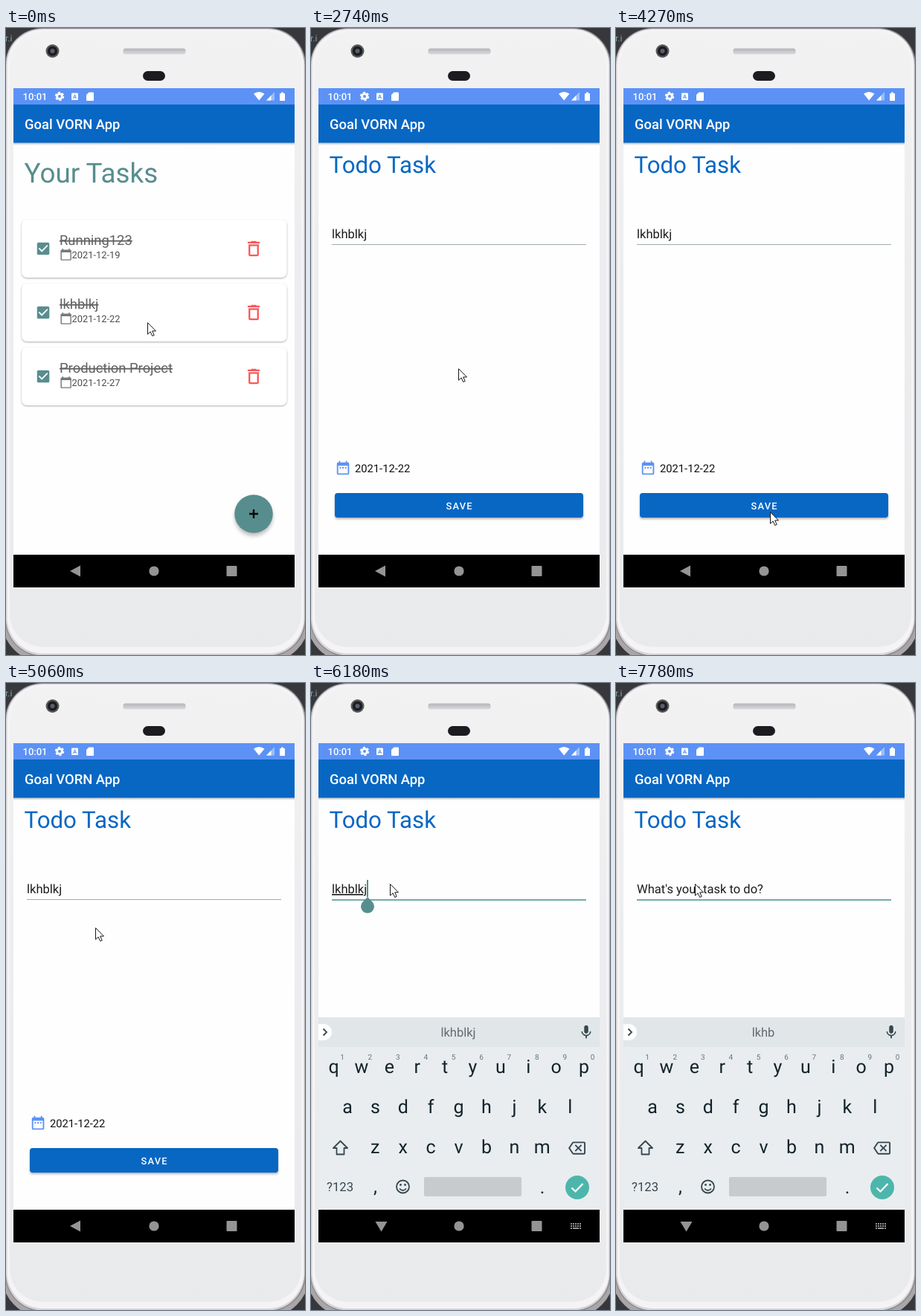
Animation of 402 by 844 pixels, one loop 8 s. Source, as an HTML page:

```html
<!DOCTYPE html>
<html lang="en">
<head>
<meta charset="utf-8">
<title>Task editing</title>
<style>
  html, body { margin: 0; width: 100%; height: 100%; overflow: hidden; background: #37383c; }
  svg { display: block; width: 100%; height: 100%; }
  text { font-family: Roboto, sans-serif; text-rendering: geometricPrecision; white-space: pre; }
  .mid { text-anchor: middle; }
  .medium { font-weight: 500; }
  .teal { fill: #588d8e; }
  .blue { fill: #0767c3; }
  .card { fill: #fff; filter: drop-shadow(0 1px 1px rgba(0,0,0,.32)); }
  .done { font-size: 18.4px; fill: #616161; text-decoration: line-through; }
  .field { font-size: 16.56px; fill: #1c1c1c; }
  .typed { text-decoration: underline; text-decoration-skip-ink: none; }
  .raised { filter: drop-shadow(0 2px 1.5px rgba(0,0,0,.3)); }
  .key { font-size: 25px; fill: #13232a; text-anchor: middle; }
  .digit { font-size: 10px; fill: #69747a; text-anchor: middle; }
  .line { fill: none; stroke: #37474f; stroke-width: 1.8; }

  /* every part switches hard at its own moments of the 8 s loop */
  .a { animation: 8s step-end infinite; }
  .off { opacity: 0; }
  .list { animation-name: list; }
  .edit { animation-name: edit; }
  .idle { animation-name: idle; }
  .focus { animation-name: focus; }
  .caret { animation-name: caret; }
  .handle { animation-name: handle; }
  .before { animation-name: before; }
  .ime { animation-name: ime; }
  .keys { animation-name: keys; }
  .full { animation-name: full; }
  .cut { animation-name: cut; }
  .short { animation-name: short; }
  .empty { animation-name: empty; }
  .guess1 { animation-name: guess1; }
  .guess2 { animation-name: guess2; }
  .pointer { animation-name: pointer; transform: translate(190px, 396px); }

  @keyframes list { 14% { opacity: 0; } }
  @keyframes edit { 14% { opacity: 1; } }
  @keyframes idle { 72% { opacity: 0; } }
  @keyframes focus { 72% { opacity: 1; } }
  @keyframes handle { 75.375% { opacity: 1; } 84.25% { opacity: 0; } }
  @keyframes before { 75.375% { opacity: 0; } }
  @keyframes ime { 75.375% { opacity: 1; } }
  @keyframes keys { 77.25% { opacity: 1; } }
  @keyframes full { 75.375% { opacity: 1; } 85.75% { opacity: 0; } }
  @keyframes cut { 85.75% { opacity: 1; } 90.625% { opacity: 0; } }
  @keyframes short { 90.625% { opacity: 1; } 92.125% { opacity: 0; } }
  @keyframes empty { 92.125% { opacity: 1; } }
  @keyframes guess1 { 90.625% { opacity: 0; } }
  @keyframes guess2 { 90.625% { opacity: 1; } }
  @keyframes caret {
    0% { opacity: 0; transform: translate(75px); }
    73.5% { opacity: 1; transform: translate(75px); }
    80.625% { opacity: 0; transform: translate(75px); }
    84.25% { opacity: 1; transform: translate(75px); }
    85.75% { opacity: 1; transform: translate(71px); }
    90.625% { opacity: 1; transform: translate(58.5px); }
    92.125% { opacity: 1; transform: translate(28px); }
    97.25%, 100% { opacity: 0; transform: translate(28px); }
  }
  @keyframes pointer {
    34.25% { transform: translate(198px, 458px); }
    35.75% { transform: translate(212px, 590px); }
    37.25% { transform: translate(219px, 681px); }
    39.125% { transform: translate(204px, 560px); }
    40.625% { transform: translate(160px, 372px); }
    42.125% { transform: translate(133px, 273px); }
    44% { transform: translate(144px, 311px); }
    45.5% { transform: translate(178px, 420px); }
    47% { transform: translate(212px, 546px); }
    48.5% { transform: translate(225px, 630px); }
    50% { transform: translate(213px, 651px); }
    51.875% { transform: translate(210px, 654px); }
    53.375% { transform: translate(207px, 651px); }
    54.875% { transform: translate(206px, 648px); }
    56.75% { transform: translate(206px, 645px); }
    59.875% { transform: translate(168px, 508px); }
    61.5% { transform: translate(133px, 371px); }
    63.25% { transform: translate(120px, 329px); }
    65.125% { transform: translate(108px, 265px); }
    66.875% { transform: translate(107px, 268px); }
    68.5%, 100% { transform: translate(106px, 270px); }
  }
</style>
</head>
<body>
<svg viewBox="0 0 402 844">
  <defs>
    <linearGradient id="face" x2="0" y2="1">
      <stop stop-color="#f2f2f3"/><stop offset=".35" stop-color="#ededef"/><stop offset="1" stop-color="#e9eaec"/>
    </linearGradient>
    <linearGradient id="slot" x2="0" y2="1">
      <stop stop-color="#b4b4b8"/><stop offset="1" stop-color="#dcdcdf"/>
    </linearGradient>
    <linearGradient id="drop" x2="0" y2="1">
      <stop stop-color="#000" stop-opacity=".28"/><stop offset="1" stop-color="#000" stop-opacity="0"/>
    </linearGradient>
    <path id="check" d="M19 3H5c-1.11 0-2 .9-2 2v14c0 1.1.89 2 2 2h14c1.11 0 2-.9 2-2V5c0-1.1-.89-2-2-2zm-9 14l-5-5 1.41-1.41L10 14.17l7.59-7.59L19 8l-9 9z"/>
    <path id="bin" d="M6 19c0 1.1.9 2 2 2h8c1.1 0 2-.9 2-2V7H6v12zM8 9h8v10H8V9zm7.5-5l-1-1h-5l-1 1H5v2h14V4h-3.5z"/>
    <path id="day" d="M20 3h-1V1h-2v2H7V1H5v2H4c-1.1 0-2 .9-2 2v16c0 1.1.9 2 2 2h16c1.1 0 2-.9 2-2V5c0-1.1-.9-2-2-2zm0 18H4V8h16v13z"/>
  </defs>

  <!-- phone body -->
  <rect width="402" height="844" fill="#37383c"/>
  <text x="-1" y="18" font-size="12" fill="#86a6b0">r.i</text>
  <rect x="-6" y="600" width="414" height="254" rx="58" fill="#aaa6a8"/>
  <rect x="-1" y="0" width="404" height="846" rx="50" fill="#8b8a8d"/>
  <rect x="0" y="1" width="401.5" height="843.5" rx="49" fill="#d5d4d7"/>
  <rect x="1.5" y="2" width="399" height="840" rx="48" fill="#f5f3f5"/>
  <rect x="5" y="6" width="392" height="827" rx="44" fill="url(#face)"/>
  <circle cx="62.5" cy="31" r="9" fill="#58585c"/>
  <circle cx="62.5" cy="31" r="6.6" fill="#1d1d21"/>
  <circle cx="62.5" cy="31" r="3" fill="#56616d"/>
  <rect x="157.5" y="27.5" width="84" height="8" rx="3" fill="url(#slot)"/>
  <rect x="184" y="58" width="30" height="13" rx="6.5" fill="#1b1b20"/>

  <!-- bars -->
  <rect x="10" y="81" width="378" height="672" fill="#fefefe"/>
  <rect x="10" y="154" width="378" height="4" fill="url(#drop)"/>
  <rect x="10" y="81" width="378" height="22" fill="#5c92f6"/>
  <rect class="blue" x="10" y="103" width="378" height="51.5"/>
  <g fill="#fff">
    <text x="22.5" y="97" font-size="13" class="medium">10:01</text>
    <circle cx="72" cy="92" r="3.4" fill="none" stroke="#fff" stroke-width="2.8"/>
    <circle cx="72" cy="92" r="5.3" fill="none" stroke="#fff" stroke-width="1.8" stroke-dasharray="3 2.55"/>
    <rect x="88" y="87.5" width="9" height="9.5" rx="1"/>
    <text x="92.5" y="95" font-size="7.5" font-weight="700" class="mid" fill="#5c92f6">A</text>
    <path d="M111.5 86.500H117a1 1 0 0 1 1 1V97a1 1 0 0 1-1 1h-8a1 1 0 0 1-1-1V90z"/>
    <path d="M333 88.500Q340 83.500 347.500 88.500L340.200 97.500z"/>
    <path d="M361 86v11.500H350z" opacity=".4"/>
    <path d="M356.500 90.700v6.800H350z"/>
    <path d="M368 88h2v-1.500h3V88h2v10h-7z"/>
    <text x="25" y="136" font-size="18.4" class="medium">Goal VORN App</text>
  </g>

  <!-- task list -->
  <g class="a list">
    <text x="24.5" y="208" font-size="36.8" class="teal">Your Tasks</text>
    <g id="cards"></g>
    <circle class="teal" cx="333" cy="654" r="25.8" style="filter:drop-shadow(0 4px 2.5px rgba(0,0,0,.25))"/>
    <path d="M327 654h12M333 648v12" stroke="#080808" stroke-width="2.4"/>
  </g>

  <!-- task editor -->
  <g class="a edit off">
    <text x="24.5" y="195" font-size="31.28" class="blue">Todo Task</text>
    <rect class="a idle" x="28" y="291" width="342" height="1" fill="#a0adac"/>
    <rect class="a focus off" x="28" y="291" width="342" height="2" fill="#72acaa"/>
    <text class="a field before" x="28" y="283">lkhblkj</text>
    <text class="a field typed full off" x="28" y="283">lkhblkj</text>
    <text class="a field typed cut off" x="28" y="283">lkhblk</text>
    <text class="a field typed short off" x="28" y="283">lkhb</text>
    <text class="a field empty off" x="28" y="283">What's your task to do?</text>
    <rect class="a caret teal off" y="265" width="2" height="23"/>
    <path class="a handle teal off" d="M76 288.1l6.36 6.36a9 9 0 1 1-12.72 0z"/>
    <path transform="translate(32 581) scale(.92)" fill="#5c92f6" d="M9 11H7v2h2v-2zm4 0h-2v2h2v-2zm4 0h-2v2h2v-2zm2-7h-1V2h-2v2H8V2H6v2H5c-1.11 0-2 .9-2 2v14c0 1.1.89 2 2 2h14c1.1 0 2-.9 2-2V6c0-1.1-.9-2-2-2zm0 16H5V9h14v11z"/>
    <text x="59" y="598" font-size="14.72" fill="#111">2021-12-22</text>
    <rect class="blue raised" x="32" y="626" width="334" height="33" rx="3.7"/>
    <text x="181.5" y="648" font-size="12.9" letter-spacing="1.15" fill="#fff" class="medium">SAVE</text>
  </g>

  <!-- keyboard -->
  <g class="a keys off">
    <rect x="10" y="450" width="378" height="259" fill="#e9edf0"/>
    <rect x="10" y="450" width="378" height="40" fill="#e1e6e9"/>
    <path d="M10 459h7a11 11 0 0 1 0 22h-7z" fill="#fff"/>
    <path class="line" d="M16.5 465.5l4.5 4.5-4.5 4.5"/>
    <text class="a guess1 mid" x="198" y="476" font-size="16.5" fill="#5f6b71">lkhblkj</text>
    <text class="a guess2 mid off" x="198" y="476" font-size="16.5" fill="#5f6b71">lkhb</text>
    <path transform="translate(359 459) scale(.92)" fill="#37474f" d="M12 14c1.66 0 3-1.34 3-3V5c0-1.66-1.34-3-3-3S9 3.34 9 5v6c0 1.66 1.34 3 3 3zm5.3-3c0 3-2.54 5.1-5.3 5.1S6.7 14 6.7 11H5c0 3.41 2.72 6.23 6 6.72V21h2v-3.28c3.28-.48 6-3.3 6-6.72h-1.7z"/>
    <g id="letters"></g>
    <path class="line" stroke-linejoin="round" d="M39.5 616.5l9.5 9.5h-4.5v8.5h-10V626H30z"/>
    <path transform="translate(346 614.5) scale(.96)" fill="#37474f" d="M22 3H7c-.69 0-1.23.35-1.59.88L0 12l5.41 8.11c.36.53.9.89 1.59.89h15c1.1 0 2-.9 2-2V5c0-1.1-.9-2-2-2zm0 16H7.07L2.4 12l4.66-7H22v14zm-11.59-2L14 13.41 17.59 17 19 15.59 15.41 12 19 8.41 17.59 7 14 10.59 10.41 7 9 8.41 12.59 12 9 15.59z"/>
    <text x="21" y="684" font-size="16.7" fill="#37474f">?123</text>
    <text class="key" x="86.5" y="686">,</text>
    <text class="key" x="311" y="687">.</text>
    <circle class="line" cx="123.5" cy="678" r="8.5"/>
    <path class="line" d="M119 680.5q4.5 5 9 0"/>
    <circle cx="120.5" cy="675.5" r="1.4" fill="#37474f"/>
    <circle cx="126.5" cy="675.5" r="1.4" fill="#37474f"/>
    <rect x="152" y="665" width="131" height="26" rx="2" fill="#c8cbce"/>
    <circle cx="358" cy="679" r="16" fill="#4db6ac"/>
    <path d="M350.5 679.5l5 5 10-10.5" fill="none" stroke="#fff" stroke-width="2.2"/>
  </g>

  <!-- navigation bar -->
  <rect x="10" y="709" width="378" height="44"/>
  <g fill="#949494">
    <path class="a before" d="M86 731l14-7.5v15z"/>
    <circle cx="199" cy="731" r="6.6"/>
    <rect x="296.5" y="724" width="14" height="14" rx="1"/>
    <g class="a ime off">
      <path d="M86.5 725h16L94.5 738.5z"/>
      <path d="M349 728h14M349 731h14" stroke="#949494" stroke-width="2" stroke-dasharray="2 1"/>
      <path d="M349 734h2m1 0h8m1 0h2" stroke="#949494" stroke-width="2"/>
    </g>
  </g>

  <path class="a pointer" d="M.5.7V16.2L4.1 12.8 6.7 18.5 9.2 17.4 6.7 11.9H11.5z" fill="#fff" stroke="#15151c"/>
</svg>
<script>
  const fill = (id, parts) => document.getElementById(id).innerHTML = parts.join('');

  const tasks = [['Running123', 19], ['lkhblkj', 22], ['Production Project', 27]];
  fill('cards', tasks.map(([name, day], i) => `
    <g transform="translate(0 ${i * 86})">
      <rect class="card" x="21" y="258" width="356.5" height="78" rx="7"/>
      <use href="#check" class="teal" transform="translate(39 286) scale(.92)"/>
      <text class="done" x="72" y="292">${name}</text>
      <use href="#day" fill="#777" transform="translate(72 296.3) scale(.72)"/>
      <text x="88.5" y="310" font-size="12.9" fill="#4c4c4c">2021-12-${day}</text>
      <use href="#bin" fill="#f95757" transform="translate(319.2 283.2) scale(1.15)"/>
    </g>`));

  const pitch = 37.4;
  const row = (chars, x, y, cls) =>
    [...chars].map((c, i) => `<text class="${cls}" x="${x + i * pitch}" y="${y}">${c}</text>`).join('');
  fill('letters', [
    row('qwertyuiop', 30.5, 525, 'key'),
    row('1234567890', 42, 507, 'digit'),
    row('asdfghjkl', 49, 579, 'key'),
    row('zxcvbnm', 86.3, 633, 'key')
  ]);
</script>
</body>
</html>
```
